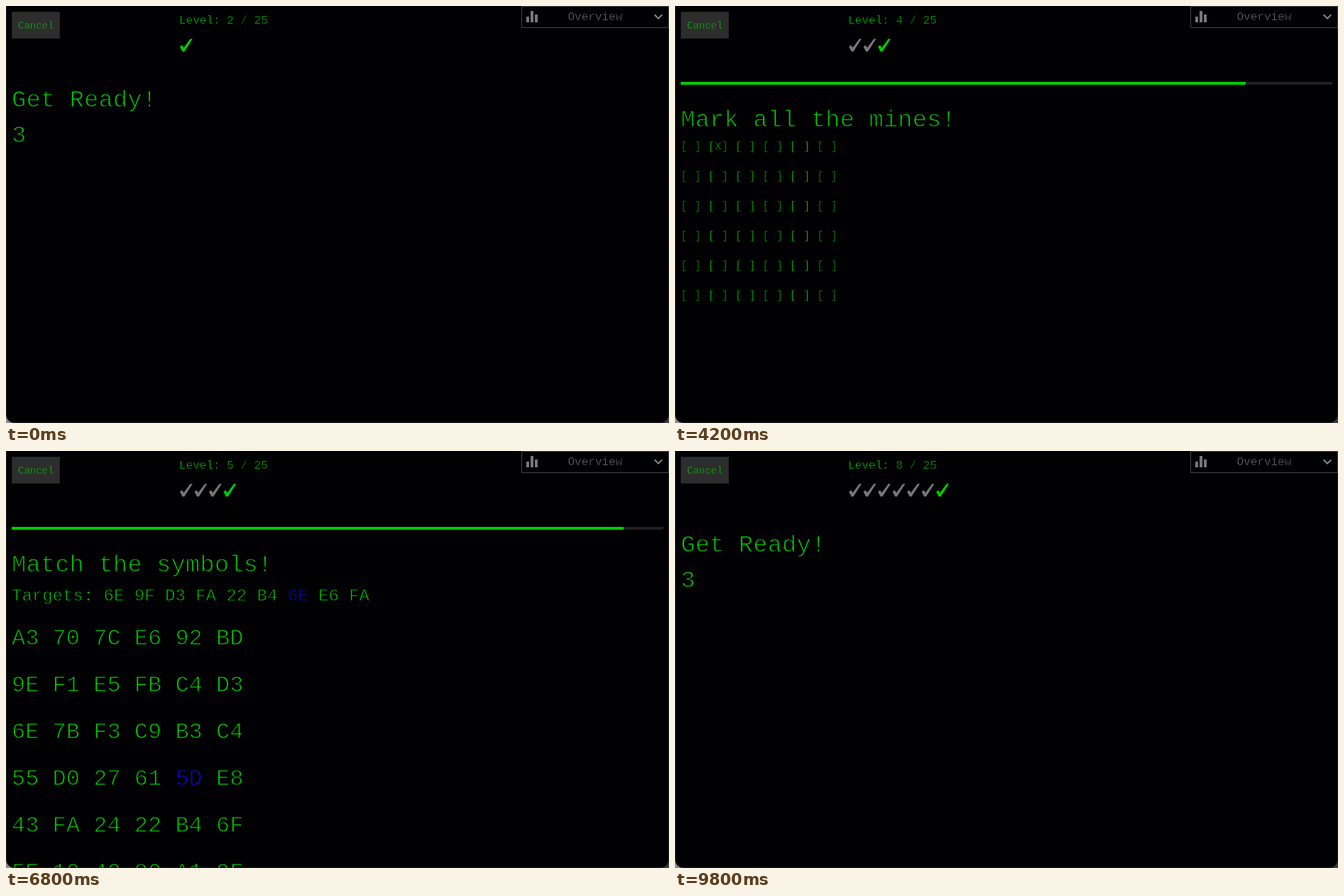
Recreate the animation shown at these times as an HTML page with a canvas. Size 934 by 588 pixels, loop 10 s.

```html
<!DOCTYPE html>
<html lang="en">
<head>
<meta charset="utf-8">
<title>Infiltration</title>
<style>
html, body { margin: 0; width: 100%; height: 100%; overflow: hidden; background: #000; }
canvas { display: block; }
</style>
</head>
<body>
<canvas id="stage" width="934" height="588"></canvas>
<script>
const ctx = document.getElementById("stage").getContext("2d");
const LOOP = 10000, STEP = 200;
const BACK = "#010103", GREEN = "#0c0", GREY = "#777", BLUE = "#1500c8";
const FONT = '"Liberation Mono", "Courier New", monospace';
const THINNING = 0.034;

// Glyphs are trimmed by an outline in the background colour for a light weight
function text(str, x, y, size = 16, color = GREEN, back = BACK) {
  ctx.font = `${size}px ${FONT}`;
  ctx.fillStyle = color;
  ctx.fillText(str, x, y);
  ctx.strokeStyle = back;
  ctx.lineWidth = size * THINNING;
  ctx.lineJoin = "round";
  ctx.strokeText(str, x, y);
}

function rect(x, y, w, h, color) {
  ctx.fillStyle = color;
  ctx.fillRect(x, y, w, h);
}

function poly(points, x, y, color) {
  ctx.fillStyle = color;
  ctx.beginPath();
  points.forEach(([px, py]) => ctx.lineTo(x + px, y + py));
  ctx.fill();
}

const CHECK = [[0, 11.4], [2.9, 9.2], [5.4, 12.8], [14.7, 0.2], [17.8, 0.2], [6.3, 18.3], [3.5, 18.3]];
const CHEVRON = [[1.4, 0], [6, 4.6], [10.6, 0], [12, 1.4], [6, 7.4], [0, 1.4]];

function frameEdge() {
  rect(0, 572, 16, 16, "#8c8c8c");
  rect(918, 572, 16, 16, "#3c3c3c");
  ctx.beginPath();
  ctx.roundRect(0.5, -20, 933, 607.5, 11);
  ctx.fillStyle = BACK;
  ctx.fill();
  ctx.strokeStyle = "#1c1c1c";
  ctx.lineWidth = 1;
  ctx.stroke();
}

function header(level) {
  rect(8, 8, 68, 38, "#222");
  rect(9, 9, 66, 36, "#2d2d2d");
  text("Cancel", 17, 32, 14, GREEN, "#2d2d2d");
  text(`Level: ${level} / 25`, 244, 25);
  for (let i = 1; i < level; i++) {
    poly(CHECK, 245 + (i - 1) * 20.5, 46, i === level - 1 ? GREEN : GREY);
  }
  ctx.strokeStyle = "#444";
  ctx.lineWidth = 1;
  ctx.strokeRect(726.5, 0.5, 207, 30);
  rect(733, 15, 4, 8, GREY);
  rect(739, 7, 4, 16, GREY);
  rect(745, 12, 4, 11, GREY);
  text("Overview", 791.5, 20, 16, GREY);
  poly(CHEVRON, 913, 11.6, "#888");
}

function countdown(n) {
  text("Get Ready!", 8, 142, 34);
  text(String(3 - n), 8, 192, 34);
}

function gameTop(barEnd, title) {
  rect(8, 107, 918, 4, "#202020");
  rect(8, 107, barEnd - 8, 4, GREEN);
  text(title, 8, 170, 34);
}

// Wire cutting
const WIRE_COLORS = ["red", "#ffc107", "blue", "white"];
const WIRES = ["|", "#", "-", "/", "."];

function wires(n) {
  gameTop(926 - n * 20, "Cut the wires with the following properties!");
  text("(keyboard 1 to 9)", 8, 212, 34);
  text("Cut wires number 3.", 8, 245);
  text("Cut all wires colored WHITE.", 8, 269);
  WIRES.forEach((type, i) => {
    const x = 8 + i * 57.6;
    text(String(i + 1), x + 9.6, 293);
    if (n > 0 && i === 2) return;
    for (let row = 0; row < 11; row++) {
      text(`|${type}|`, x, 317 + row * 24, 16, WIRE_COLORS[(i * 3 + row * (i % 2)) % 4]);
    }
  });
}

function code() {
  gameTop(926, "Enter the Code!");
  text("←", 8, 264, 80);
}

// Mines: memorise first, then sweep the cursor row by row
const MINES = [4, 9, 13, 20, 24, 28, 33];

function mines(n) {
  const marking = n >= 9;
  const cursor = 1 + (n - 9) * 7;
  gameTop(916 - n * 12.44, `${marking ? "Mark" : "Remember"} all the mines!`);
  for (let i = 0; i < 36; i++) {
    const mine = MINES.includes(i);
    let mark = " ";
    if (!marking) mark = mine ? "?" : " ";
    else if (i === Math.min(cursor, 35)) mark = "X";
    else if (mine && i < cursor) mark = ".";
    text(`[${mark}]`, 8 + (i % 6) * 38.4, 203 + Math.floor(i / 6) * 42);
  }
}

// Symbol matching: one key press per entry of the walk
const TARGETS = "6E 9F D3 FA 22 B4 6E E6 FA".split(" ");
const SYMBOLS = ("A3 70 7C E6 92 BD 9E F1 E5 FB C4 D3 6E 7B F3 C9 B3 C4 " +
  "55 D0 27 61 5D E8 43 FA 24 22 B4 6F 5E 10 42 80 A1 9F").split(" ");

function buildWalk() {
  let x = 0, y = 0;
  const walk = [{ x, y, target: 0 }];
  TARGETS.forEach((symbol, target) => {
    const at = SYMBOLS.indexOf(symbol), tx = at % 6, ty = Math.floor(at / 6);
    while (x !== tx || y !== ty) {
      if (y !== ty) y += Math.sign(ty - y);
      else x += Math.sign(tx - x);
      walk.push({ x, y, target });
    }
    walk.push({ x, y, target: target + 1 });
  });
  return walk;
}
const WALK = buildWalk();

function match(n) {
  const { x, y, target } = WALK[Math.min(5 + Math.round(n * 6.4), WALK.length - 1)];
  gameTop(926 - n * 14, "Match the symbols!");
  text("Targets:", 8, 211, 24);
  TARGETS.forEach((s, i) =>
    text(s, 8 + 14.4 * (9 + i * 3), 211, 24, i === target ? BLUE : GREEN));
  SYMBOLS.forEach((s, i) => {
    const col = i % 6, row = Math.floor(i / 6);
    text(s, 8 + col * 57.6, 273 + row * 66, 32, col === x && row === y ? BLUE : GREEN);
  });
}

const PHRASE = "OPENSOURCE FINDER DATABASE STORAGE";

function backward(n) {
  gameTop(834 + (4 - n) * 20.4, "Type it backward");
  ctx.save();
  ctx.translate(455.5, 0);
  ctx.scale(-1, 1);
  text(PHRASE, 0, 226);
  ctx.restore();
  text(PHRASE.slice(0, Math.round(28 - (4 - n) * 6.3)) + "|", 479, 226);
}

function brackets() {
  gameTop(915, "Close the brackets");
  text("[({<>|", 8, 262, 80);
}

// Each scene opens with a three-step countdown
const SCENES = [
  { start: 0, level: 2, game: wires },
  { start: 5, level: 3, game: code },
  { start: 9, level: 4, game: mines },
  { start: 27, level: 5, game: match },
  { start: 37, level: 6, game: backward },
  { start: 45, level: 7, game: brackets },
  { start: 49, level: 8 }
];

function draw(time) {
  const step = Math.floor((time % LOOP) / STEP);
  const scene = SCENES.findLast(s => s.start <= step);
  const n = step - scene.start;
  ctx.clearRect(0, 0, 934, 588);
  frameEdge();
  header(scene.level);
  if (n < 3) countdown(n);
  else scene.game(n - 3);
}

const begin = performance.now();
function tick() {
  draw(performance.now() - begin);
  requestAnimationFrame(tick);
}
tick();
</script>
</body>
</html>
```
